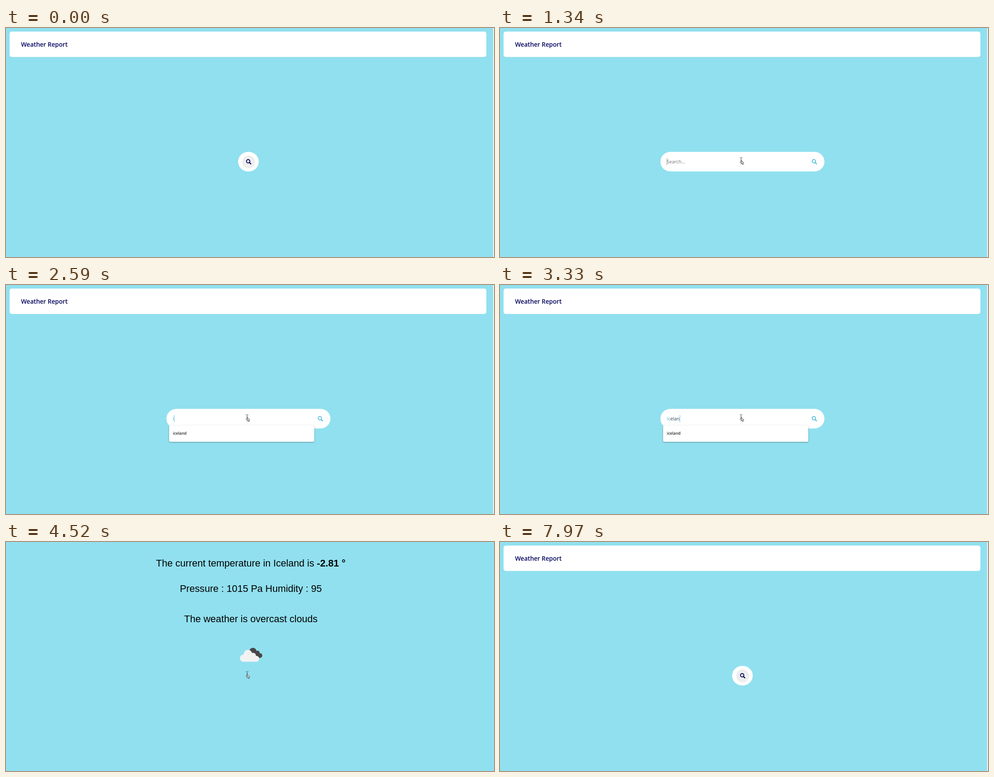
Animation of 1089 by 514 pixels, one loop 8 s. Source, as an HTML page:

```html
<!DOCTYPE html>
<html lang="en">
<head>
<meta charset="utf-8">
<title>Weather Report</title>
<style>
  html, body { margin: 0; width: 100%; height: 100%; overflow: hidden; background: #91e0ef; }
  body { position: relative; font-family: "Open Sans", "Noto Sans", sans-serif; }
  .page, .cursor, .cursor svg { position: absolute; left: 0; top: 0; overflow: visible; }
  .page { width: 1089px; height: 514px; }
  .home, .result, .pill, .icon, .menu, .cursor, .cursor svg { animation: 8s step-end infinite; }
  .home { animation-name: home; }
  .result { opacity: 0; animation-name: result; }

  header {
    position: absolute; left: 8px; top: 8px; width: 1064px; height: 57px;
    box-sizing: border-box; padding-left: 25.5px; border-radius: 5px; background: #fff;
    color: #03045e; font-size: 13.6px; font-weight: 600; line-height: 57px;
  }
  .scrollbar { position: absolute; right: 0; top: 0; width: 2px; height: 100%; background: #f1f1f1; }

  .pill {
    position: absolute; left: 540.5px; top: 278px; width: 46px; height: 43.5px;
    transform: translateX(-50%); border-radius: 22px; background: #fff; animation-name: pill;
  }
  .input {
    position: absolute; left: 14px; right: 36px; top: 0; height: 100%; overflow: hidden;
    white-space: nowrap; font-size: 10.5px; line-height: 44.5px; color: #2f4a5c;
  }
  .hint { color: #757575; }
  .letters { padding-left: .5px; }
  .letters span:nth-child(1) { color: #62b9d0; }
  .letters span:nth-child(2) { color: #4f93a8; }
  .caret { position: absolute; top: 14px; width: 1px; height: 16px; background: #999; }
  .typing .caret { background: #5cc4e0; }
  .icon {
    position: absolute; right: 7.5px; top: 7.5px; width: 29px; height: 29px;
    border-radius: 50%; background: #eee; color: #03045e; animation-name: hover;
  }

  .menu {
    position: absolute; left: 363.5px; top: 315px; width: 324px; height: 166px;
    box-sizing: border-box; padding: 5px 9px; overflow: hidden; border-radius: 3px;
    background: #fff; box-shadow: 0 1px 3px rgba(0, 0, 0, .4);
    color: #262626; font-size: 8.8px; font-weight: 600; line-height: 26px;
    opacity: 0; animation-name: menu;
  }

  .result text { font: 21.6px "Liberation Sans", Arial, sans-serif; text-anchor: middle; }
  .result .bold { font-weight: bold; }

  .cursor { width: 0; height: 0; animation-name: move, shown; animation-timing-function: linear, step-end; }
  .arrow { animation-name: arrow; }
  .beam { animation-name: beam; }

  @keyframes home { 0% { opacity: 1 } 56.47% { opacity: 0 } 99.6%, 100% { opacity: 1 } }
  @keyframes result { 0% { opacity: 0 } 56.47% { opacity: 1 } 99.6%, 100% { opacity: 0 } }
  @keyframes pill {
    0% { width: 46px }
    7.93% { width: 46px; animation-timing-function: steps(6) }
    13.03% { width: 366px }
    60%, 100% { width: 46px }
  }
  @keyframes hover {
    0% { background: #eee; color: #03045e }
    7.93% { background: #fff; color: #5bbfdc }
    60%, 100% { background: #eee; color: #03045e }
  }
  @keyframes menu {
    0% { opacity: 0; height: 166px }
    17.5% { opacity: .5; height: 166px }
    18.35% { opacity: 1; height: 166px }
    32% { opacity: 1; height: 36.5px }
    55%, 100% { opacity: 0; height: 36.5px }
  }
  @keyframes move {
    0% { transform: translate(1014px, 510px) }
    2% { transform: translate(1014px, 510px); animation-timing-function: cubic-bezier(.35, .6, .6, 1) }
    8.75% { transform: translate(546px, 289px) }
    10.4%, 11.4% { transform: translate(545.5px, 283.5px) }
    15%, 68.1% { transform: translate(538px, 296px) }
    68.12% { transform: translate(537px, 295px) }
    74.2% { transform: translate(537px, 295px); animation-timing-function: ease-in-out }
    79%, 100% { transform: translate(56px, 0) }
  }
  @keyframes shown { 0% { opacity: 0 } 2% { opacity: 1 } 79.8%, 100% { opacity: 0 } }
  @keyframes arrow { 0% { opacity: 1 } 13.1% { opacity: 0 } 68.1%, 100% { opacity: 1 } }
  @keyframes beam { 0% { opacity: 0 } 13.1% { opacity: 1 } 68.1%, 100% { opacity: 0 } }
</style>
</head>
<body>
  <div class="page home">
    <header>Weather Report</header>
    <div class="scrollbar"></div>
    <div class="pill">
      <div class="input"><span class="letters"><span>I</span><span>c</span><span>e</span><span>l</span><span>a</span><span>n</span><span>d</span></span><i class="caret"></i><span class="hint">Search...</span></div>
      <svg class="icon" viewBox="0 0 29 29" fill="none" stroke="currentColor">
        <circle cx="13.4" cy="13.1" r="3.8" stroke-width="1.9"/>
        <path d="M16.3 16L19.2 18.9" stroke-width="2.4" stroke-linecap="round"/>
      </svg>
    </div>
    <div class="menu">
      <div class="rest">Mumbai</div>
      <div class="rest">London</div>
      <div class="rest">Delhi</div>
      <div>iceland</div>
      <div class="rest">hyderabad</div>
      <div class="rest">Hyderabad</div>
    </div>
  </div>

  <svg class="page result" viewBox="0 0 1089 514">
    <text x="546.2" y="55">The current temperature in Iceland is <tspan class="bold">-2.81 °</tspan></text>
    <text x="546.4" y="112">Pressure : 1015 Pa Humidity : 95</text>
    <text x="546.4" y="180">The weather is overcast clouds</text>
    <g fill="#484848">
      <circle cx="551" cy="245.5" r="8"/>
      <circle cx="561" cy="249" r="5.2"/>
      <circle cx="566.6" cy="254.8" r="5.4"/>
      <path d="M548 245h13l5 8v7.2h-18z"/>
    </g>
    <g fill="#f2f2f2">
      <circle cx="540" cy="251.3" r="9.4"/>
      <circle cx="530" cy="260.8" r="8"/>
      <circle cx="551.5" cy="255" r="6.2"/>
      <circle cx="558.5" cy="262.2" r="6.6"/>
      <path d="M530 255h24l4.5 7v6.8H530z"/>
    </g>
  </svg>

  <div class="cursor">
    <svg class="arrow" width="1" height="1"><path d="M0 0V9.4L2.1 7.5 3.6 10.9 4.9 10.3 3.5 7H6.3Z" fill="#fff" stroke="#222" stroke-width=".8"/></svg>
    <svg class="beam" width="1" height="1"><path d="M-2.8-5h2.3M.5-5h2.3M0-4.6V4.6M-2.8 5h2.3M.5 5h2.3" fill="none" stroke="#444"/></svg>
  </div>

<script>
  const LOOP = 8000;
  const keyTimes = [2560, 2710, 2860, 3010, 3190, 3330, 4070];
  const caretSpans = [[1340, 1930], [2470, 3870], [4070, 4520]];

  const find = selector => document.querySelector(selector);
  const input = find('.input');
  const caret = find('.caret');
  const hint = find('.hint');
  const letters = [...find('.letters').children];
  const rest = [...document.querySelectorAll('.rest')];
  const show = (el, on) => { el.style.display = on ? '' : 'none'; };

  function draw(t) {
    const typing = t >= keyTimes[0];
    letters.forEach((letter, i) => show(letter, t >= keyTimes[i]));
    rest.forEach(item => show(item, !typing));
    show(hint, !typing);
    show(caret, caretSpans.some(([from, to]) => t >= from && t < to));
    input.classList.toggle('typing', typing);
  }

  let start;
  function tick(now) {
    start ??= now;
    draw((now - start) % LOOP);
    requestAnimationFrame(tick);
  }
  draw(0);
  requestAnimationFrame(tick);
</script>
</body>
</html>
```
